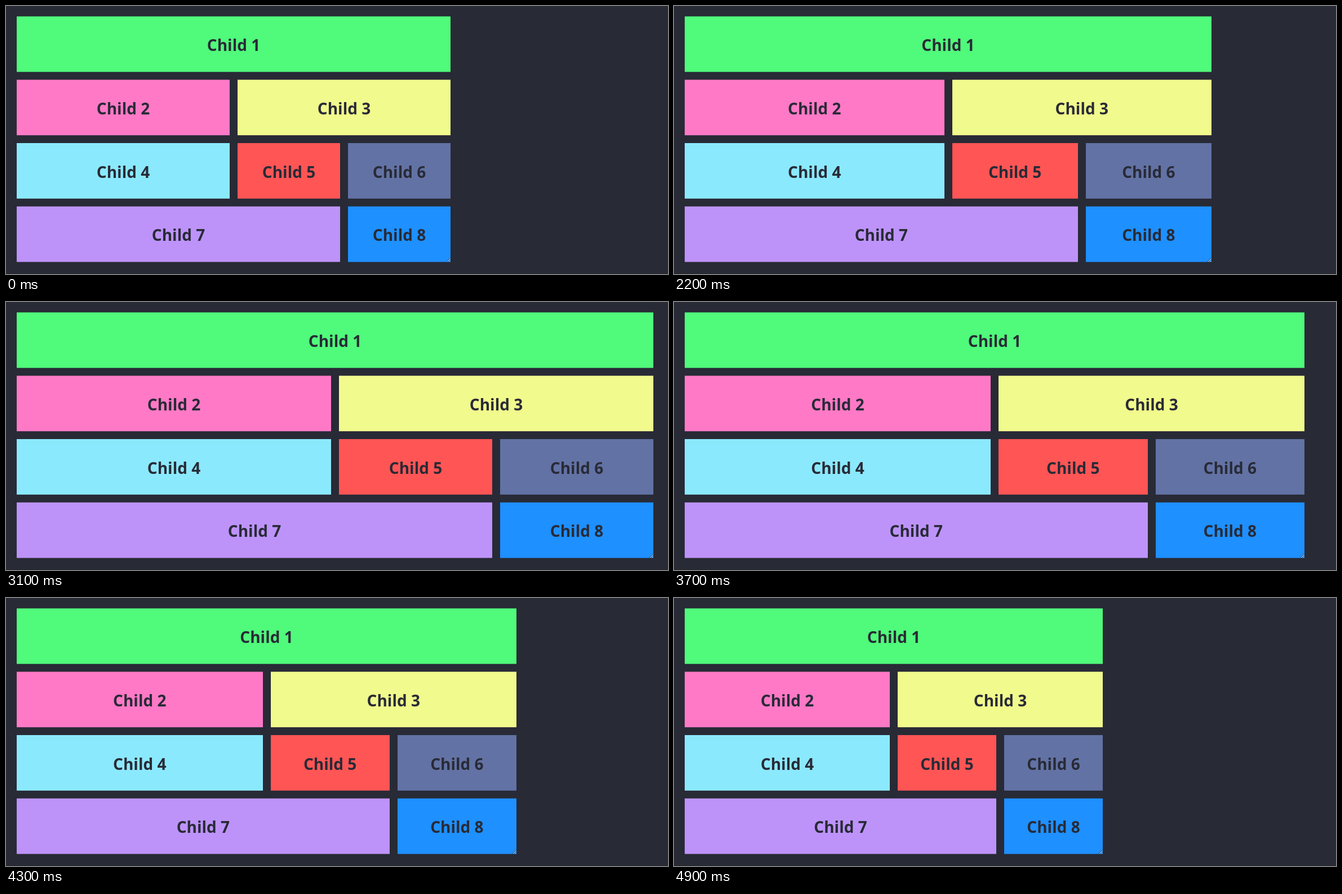
An HTML page with a canvas for the animation above (5.8 s loop, 1175x477 px).

```html
<!DOCTYPE html>
<html lang="en">
<head>
<meta charset="utf-8">
<title>Resizable grid</title>
<style>
  html, body { margin: 0; width: 100%; height: 100%; overflow: hidden; background: #282a36; }
  canvas { display: block; }
</style>
</head>
<body>
<canvas id="stage" width="1175" height="477"></canvas>
<script>
const ctx = document.getElementById('stage').getContext('2d');
const LOOP = 5800, STEP = 100;
const LEFT = 19, TOP = 18.5, GAP = 14, ROW = 98.8, PITCH = 112.75;
const DARK = '#282a36';

// [row, first column, column span, colour]
const cells = [
  [0, 0, 4, '#50fa7b'],
  [1, 0, 2, '#ff79c6'],
  [1, 2, 2, '#f1fa8c'],
  [2, 0, 2, '#8be9fd'],
  [2, 2, 1, '#ff5555'],
  [2, 3, 1, '#6272a4'],
  [3, 0, 3, '#bd93f9'],
  [3, 3, 1, '#1e90ff']
];

// [time, right edge of the grid]
const keys = [
  [0, 789], [1700, 789], [1800, 801], [2300, 991], [2600, 1074], [2900, 1125],
  [3100, 1149], [3200, 1149], [3400, 1156], [3500, 1156], [4000, 1004],
  [4100, 963], [4600, 830], [4700, 802], [4900, 761], [LOOP, 761]
];

const rate = i => (keys[i + 1][1] - keys[i][1]) / (keys[i + 1][0] - keys[i][0]);

// Harmonic mean of the neighbouring rates keeps the curve monotone
function slope(i) {
  if (i === 0 || i === keys.length - 1) return 0;
  const a = rate(i - 1), b = rate(i);
  return a * b > 0 ? 2 * a * b / (a + b) : 0;
}

function rightEdge(t) {
  let i = 0;
  while (i < keys.length - 2 && t >= keys[i + 1][0]) i++;
  const [t0, a] = keys[i], [t1, b] = keys[i + 1];
  const d = t1 - t0, u = (t - t0) / d, v = 1 - u;
  return a * v * v * (1 + 2 * u) + b * u * u * (3 - 2 * u)
    + d * u * v * (slope(i) * v - slope(i + 1) * u);
}

function line(x0, y0, x1, y1, color) {
  ctx.strokeStyle = color;
  ctx.beginPath();
  ctx.moveTo(x0, y0);
  ctx.lineTo(x1, y1);
  ctx.stroke();
}

function drawHandle(right) {
  ctx.lineWidth = 1;
  for (const size of [7, 3.5]) {
    line(right - size, 455, right - 0.5, 455.5 - size, DARK);
    line(right - size + 1, 455, right - 0.5, 456.5 - size, '#dcecff');
  }
}

function draw(t) {
  const right = Math.round(rightEdge(t));
  const col = (right - LEFT - 3 * GAP) / 4;
  ctx.fillStyle = DARK;
  ctx.fillRect(0, 0, 1175, 477);
  ctx.fillStyle = '#20222b';
  ctx.fillRect(0, 476, 1175, 1);

  ctx.font = '700 28px "Open Sans", "Noto Sans", sans-serif';
  ctx.textAlign = 'center';
  ctx.textBaseline = 'alphabetic';
  cells.forEach(([row, first, span, color], i) => {
    const x0 = LEFT + first * (col + GAP);
    const x1 = x0 + span * col + (span - 1) * GAP;
    const y = TOP + row * PITCH;
    ctx.fillStyle = color;
    ctx.fillRect(Math.round(x0), y, Math.round(x1) - Math.round(x0), ROW);
    ctx.fillStyle = DARK;
    ctx.fillText('Child ' + (i + 1), (x0 + x1) / 2, y + 61.5);
  });
  drawHandle(right);
}

const start = performance.now();
function tick() {
  const t = (performance.now() - start) % LOOP;
  draw(Math.floor(t / STEP) * STEP);
  requestAnimationFrame(tick);
}
tick();
</script>
</body>
</html>
```
